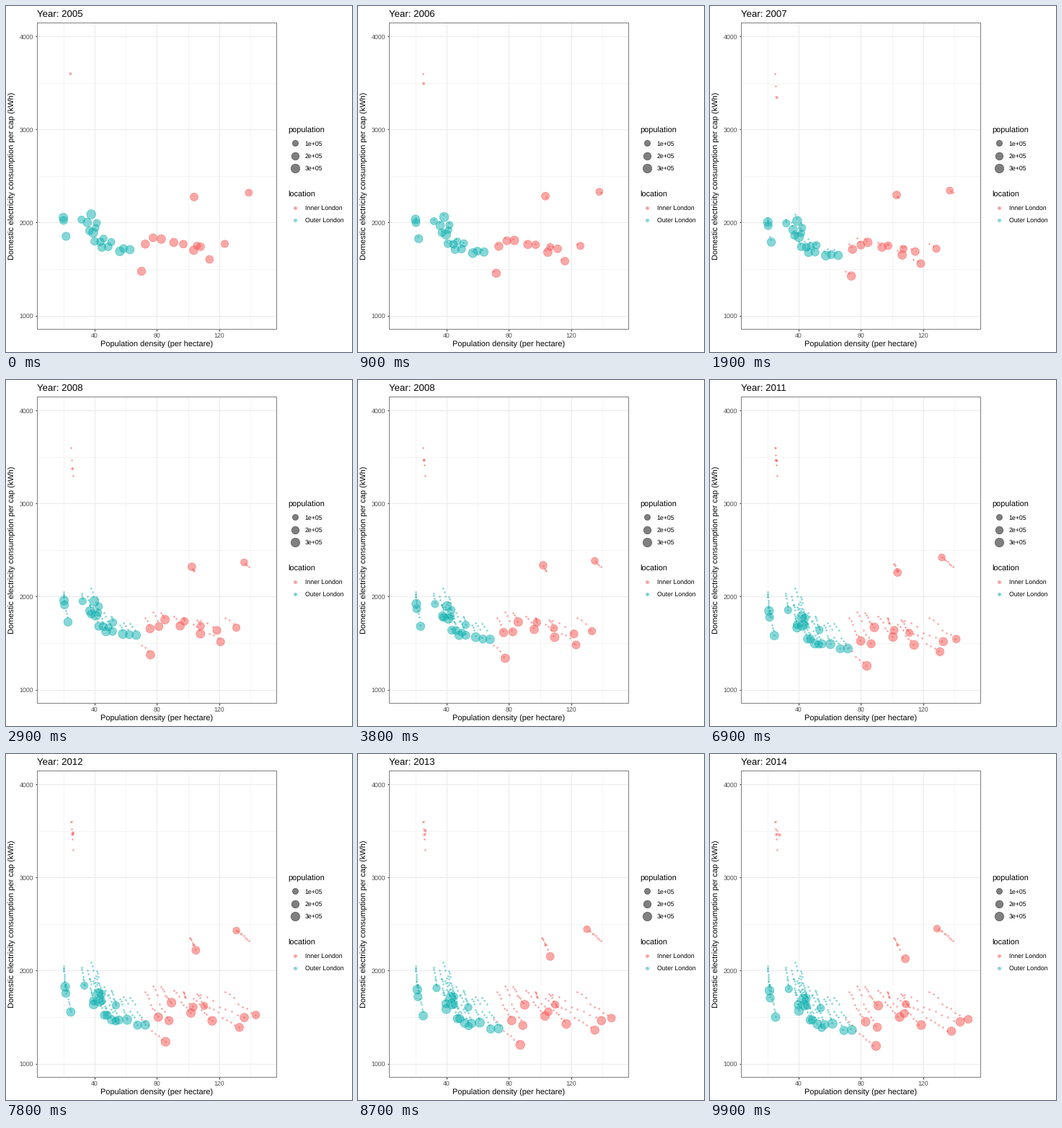
These frames come from a looping animation (480x480 px, 10000 ms). A matplotlib script:

```python
import numpy as np
import matplotlib.pyplot as plt
from matplotlib.animation import FuncAnimation
from matplotlib.patches import Rectangle

FRAMES, STEPS = 100, 11
YEARS = np.arange(10)
RED, TEAL = "#F7524F", "#0FB0B0"
DARK, GREY, GRID = "#333333", "#4D4D4D", "#EBEBEB"
LEFT, RIGHT, TOP, BOTTOM = 43.3, 375.4, 23.3, 448.2

plt.rcParams["font.family"] = "Liberation Sans"
plt.rcParams["text.hinting"] = "none"

# Share of the total fall in consumption reached each year
FALL = np.array([0, 0.09, 0.21, 0.44, 0.54, 0.61, 0.75, 0.83, 0.97, 1])


def px(density):
    return 122.8 + (density - 40) * 2.1625


def py(kwh):
    return 429.5 - (kwh - 1000) * 0.12907


def radius(size):
    return (size * 2.845 + 0.94) * 0.375


def pop_radius(thousands):
    share = np.clip((thousands - 7.1) / 368, 0, 1)
    return radius(1 + 5 * np.sqrt(share))


def yearly(start, end, pop, via=(), ease=1.0):
    """Yearly x, y and radius on a path from start to end.

    via holds (year, x, y) stops; population grows with density."""
    growth = 1 - (1 - YEARS / 9) ** ease
    at, xs, ys = zip((0, *start), *via, (9, *end))
    at = list(at)
    x = np.interp(growth, growth[at], xs)
    y = np.interp(FALL, FALL[at], ys)
    density = 40 + (x - px(40)) / 2.1625
    return np.column_stack([x, y, pop_radius(pop * density / density[0])])


# Start, end (pixels) and first population (thousands) of each borough
OUTER = [
    ((79.5, 293.5), (82.5, 328.3), 299), ((80, 297.5), (83.5, 338.5), 230),
    ((83.3, 319.5), (91, 365), 251), ((104.7, 296.3), (109.3, 326), 181),
    ((112.8, 300.3), (123.3, 356.3), 285), ((115.8, 311.8), (122.3, 348), 222),
    ((118.2, 289), (129.7, 340), 328), ((121, 314.5), (130.5, 348.5), 338),
    ((126, 301), (134, 338.5), 181), ((124.5, 307.8), (134.5, 349.5), 152),
    ((123, 326.5), (139, 369), 224), ((131, 327.3), (142, 369), 220),
    ((135.5, 322.5), (155, 380), 165), ((133, 334.8), (149, 375), 252),
    ((141.7, 334), (159, 375.5), 230), ((146, 327.5), (153.5, 352.5), 190),
    ((158, 340.3), (169.8, 374), 312), ((163, 336.5), (185.8, 383.5), 227),
    ((172, 338), (196.8, 382.8), 271),
]
INNER = [
    ((89.5, 94), (96.5, 112.3), 7.1,
     [(2, 93, 133), (3, 92, 117.5), (5, 90.8, 94), (6, 92, 112), (8, 93.4, 106)]),
    ((188, 368), (230.3, 405), 254), ((193.3, 330.3), (216, 371.5), 255),
    ((204, 321.5), (232, 379), 229), ((215.3, 323.3), (233.5, 349), 283),
    ((232.8, 328), (263, 365), 262),
    ((246, 330.3), (269.5, 360), 211, [(5, 249, 338)]),
    ((261, 265), (271, 284), 223, [(5, 255, 255)]),
    ((260.3, 338.8), (293, 376), 277),
    ((265, 332.5), (271.5, 347), 173, [(6, 277, 351)]),
    ((270, 334), (347, 371.5), 213), ((282.3, 351.5), (335, 384.5), 216),
    ((303.5, 330), (358.3, 368), 184), ((336.8, 259), (315, 242.3), 168),
]

fig = plt.figure(figsize=(480 / 72, 480 / 72), dpi=72, facecolor="white")
ax = fig.add_axes([0, 0, 1, 1])
ax.set(xlim=(0, 480), ylim=(480, 0))
ax.axis("off")


def line(x, y, color, width):
    ax.plot(x, y, color=color, lw=width, zorder=1, solid_capstyle="butt")


def label(x, y, text, size, color="black", **kw):
    return ax.text(x, y, text, fontsize=size, color=color, **kw)


def dots(x, y, r, color, z=4, edge=0.75):
    return ax.scatter(x, y, s=(2 * np.asarray(r)) ** 2, facecolor=(color, 0.5),
                      edgecolor=(color, 0.5), linewidth=edge, zorder=z)


# Panel
for d in range(20, 141, 20):
    major = d % 40 == 0
    line([px(d)] * 2, [TOP, BOTTOM], GRID, 1.07 if major else 0.55)
    if major:
        line([px(d)] * 2, [BOTTOM, BOTTOM + 2.75], DARK, 1.07)
        label(px(d), 460.3, str(d), 8.8, GREY, ha="center")
for k in range(1000, 4001, 500):
    major = k % 1000 == 0
    line([LEFT, RIGHT], [py(k)] * 2, GRID, 1.07 if major else 0.55)
    if major:
        line([LEFT - 2.75, LEFT], [py(k)] * 2, DARK, 1.07)
        label(38.2, py(k) + 3.2, str(k), 8.8, GREY, ha="right")
ax.add_patch(Rectangle((LEFT, TOP), RIGHT - LEFT, BOTTOM - TOP, fill=False,
                       edgecolor="#7F7F7F", lw=1, zorder=6))

label(209.3, 473, "Population density (per hectare)", 11, ha="center")
label(14.3, 236, "Domestic electricity consumption per cap (kWh)", 11,
      ha="right", va="center", rotation=90)
title = label(43, 15, "", 13.2)

# Legends
label(391.7, 176, "population", 11)
for i in (1, 2, 3):
    y = 173 + 17.3 * i
    dots([400.7], [y], [pop_radius(100 * i)], "black")
    label(414.7, y + 3.2, f"{i}e+05", 8.8)
label(391.7, 265, "location", 11)
for y, name, color in ((279.8, "Inner London", RED), (297.2, "Outer London", TEAL)):
    dots([400.9], [y], [radius(1.5)], color)
    label(414.7, y + 3.2, name, 8.8)

groups = []
for rows, color, ease in ((INNER, RED, 1.0), (OUTER, TEAL, 1.25)):
    data = np.array([yearly(*row, ease=ease) for row in rows])
    trail = dots([], [], [], color, z=3, edge=0.5)
    trail.set_sizes([4])
    groups.append((data, trail, dots(*data[:, 0].T, color)))


def update(i):
    year, step = divmod(i, STEPS)
    f = step / STEPS
    past = year + (step > 0)
    for data, trail, bubbles in groups:
        now = data[:, year] * (1 - f) + data[:, min(year + 1, 9)] * f
        bubbles.set_offsets(now[:, :2])
        bubbles.set_sizes((2 * now[:, 2]) ** 2)
        trail.set_offsets(data[:, :past, :2].reshape(-1, 2))
    title.set_text(f"Year: {round(2005 + i / STEPS)}")
    return []


anim = FuncAnimation(fig, update, frames=FRAMES, interval=100,
                     repeat=True, repeat_delay=0)
plt.show()
```
